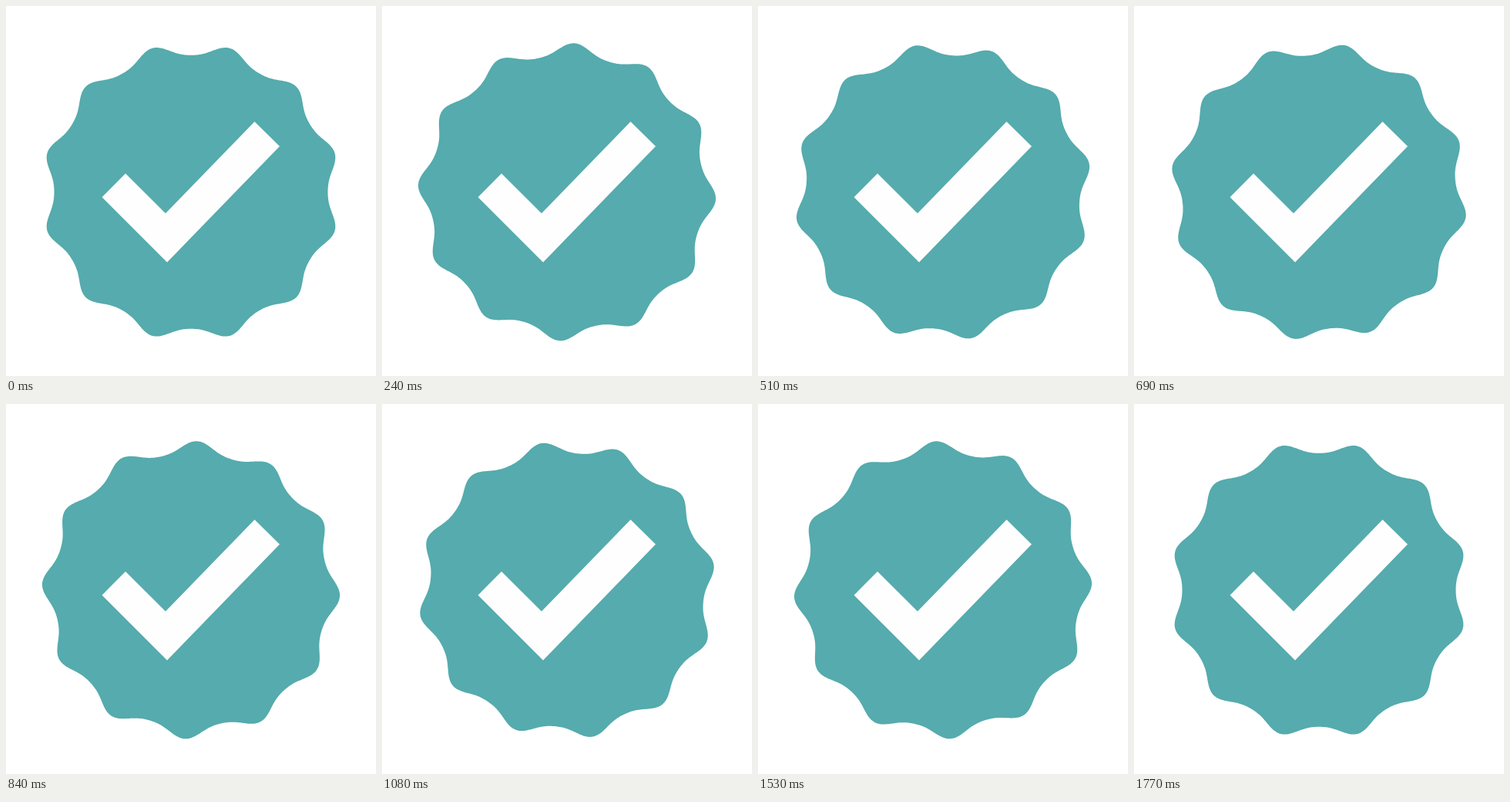
An HTML page with a canvas that plays this animation: 480x480 px, repeating every 1.8 s.

```html
<!DOCTYPE html>
<html lang="en">
<head>
<meta charset="utf-8">
<title>Check badge</title>
<style>
  html, body { margin: 0; width: 100%; height: 100%; overflow: hidden; background: #fff; }
  canvas { display: block; width: 480px; height: 480px; }
</style>
</head>
<body>
<canvas id="stage" width="480" height="480"></canvas>
<script>
  const ctx = document.getElementById('stage').getContext('2d');
  const STEP = 30, STEPS = 60;
  const LOBES = 12, CX = 240, CY = 241.3;
  const CHECK = [[124.5, 248], [155, 217.3], [207, 269], [322.5, 150], [355, 182], [209, 332.5]];

  function fillShape(points, color) {
    ctx.beginPath();
    for (const [x, y] of points) ctx.lineTo(x, y);
    ctx.closePath();
    ctx.fillStyle = color;
    ctx.fill();
  }

  // Scalloped edge; the second harmonic tightens the lobes and widens the dips.
  function radius(angle) {
    const u = angle * LOBES;
    return 184.35 + 7.85 * Math.cos(u) + Math.cos(2 * u);
  }

  function badge(turn) {
    const points = [];
    for (let i = 0; i < 720; i++) {
      const a = i * Math.PI / 360;
      const r = radius(a);
      points.push([CX + r * Math.sin(a + turn), CY - r * Math.cos(a + turn)]);
    }
    return points;
  }

  function draw(time) {
    const step = Math.floor(time / STEP) % STEPS;
    const turn = Math.PI / LOBES - (Math.PI / 2) * step / (STEPS - 1);
    ctx.fillStyle = '#fff';
    ctx.fillRect(0, 0, 480, 480);
    fillShape(badge(turn), '#55abad');
    fillShape(CHECK, '#fefefe');
  }

  const start = performance.now();
  function tick() {
    draw(performance.now() - start);
    requestAnimationFrame(tick);
  }
  tick();
</script>
</body>
</html>
```
